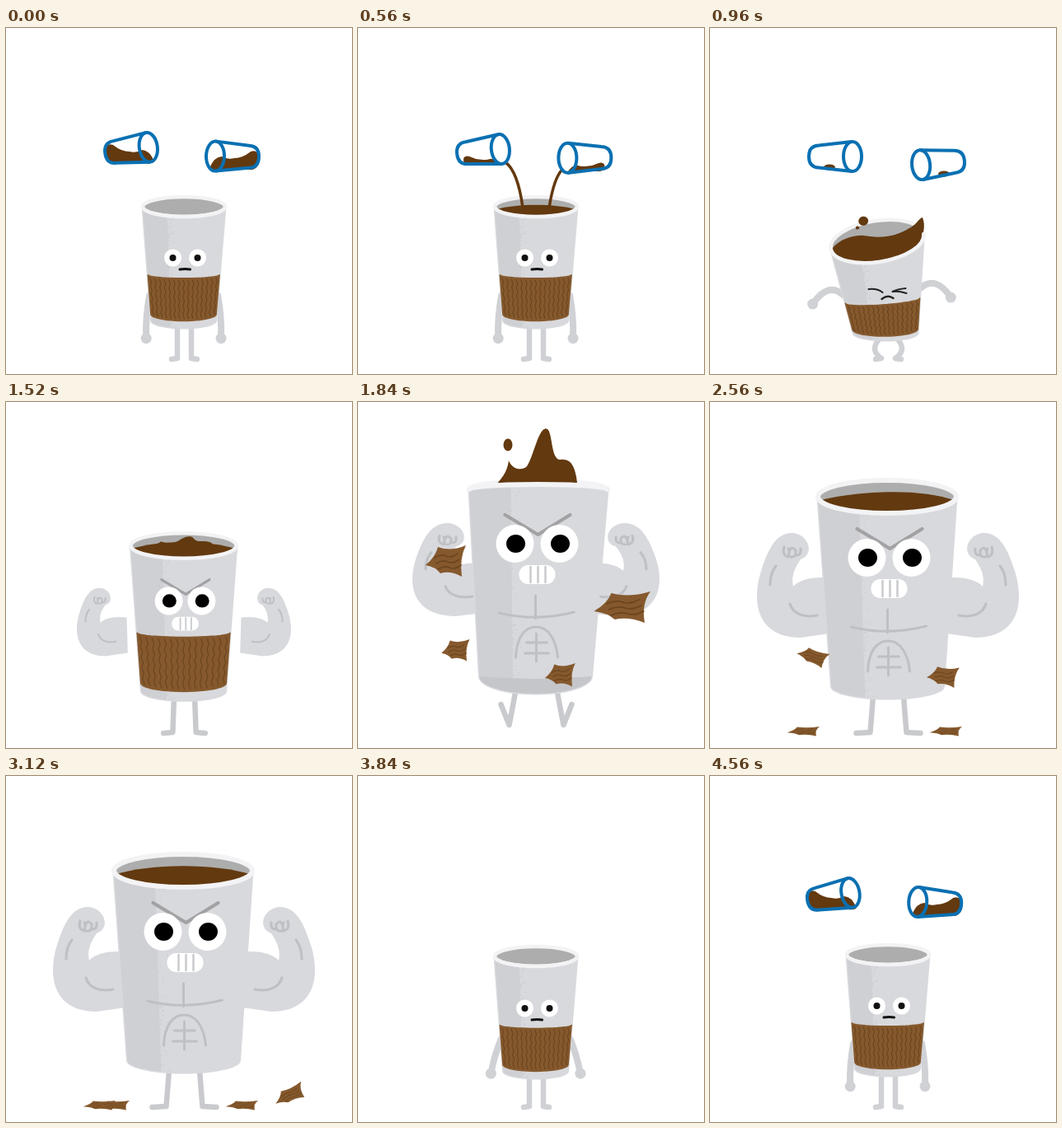
Recreate the animation shown at these times as an HTML page. Size 420 by 420 pixels, loop 4640 ms.

```html
<!DOCTYPE html>
<html lang="en">
<head>
<meta charset="utf-8">
<title>Coffee power</title>
<style>
html, body { margin: 0; width: 100%; height: 100%; overflow: hidden; background: #fff; }
svg { display: block; width: 100vw; height: 100vh; }
</style>
</head>
<body>
<svg id="stage" viewBox="0 0 420 420" fill="none" stroke-linecap="round" stroke-linejoin="round"></svg>
<script>
const LOOP = 4640, STEP = 80, BURST = 1680, HOP = 1840;
const COFFEE = '#63390f', CARD = '#85592d', CARD_DARK = '#6c451e', LINE = '#bfc0c4';
const BLUE = '#0a70b2', RIM = '#f3f3f5', WALL = '#d8d9dd', SHADE = '#cfd0d4', LIMB = '#d0d1d5';
const stage = document.getElementById('stage');

// Timing helpers
const mix = (a, b, k) => a + (b - a) * k;
const within = (t, a, b) => t >= a && t < b;
function ramp(t, a, b) {
  const k = Math.min(1, Math.max(0, (t - a) / (b - a)));
  return k * k * (3 - 2 * k);
}
const bell = (t, mid, half) => Math.abs(t - mid) < half ? Math.cos((t - mid) / half * Math.PI / 2) ** 2 : 0;

// Drawing helpers
const path = (d, fill, stroke, w = 3) =>
  `<path d="${d}" fill="${fill || 'none'}" ${stroke ? `stroke="${stroke}" stroke-width="${w}"` : ''}/>`;
const oval = (x, y, rx, ry, fill, more = '') =>
  `<ellipse cx="${x}" cy="${y}" rx="${rx}" ry="${ry}" fill="${fill}" ${more}/>`;
const group = (tf, s) => `<g transform="${tf}">${s}</g>`;
const twins = (axis, s) => s + group(`translate(${2 * axis} 0) scale(-1 1)`, s);
const poly = pts => 'M' + pts.map(p => p.map(n => n.toFixed(1)).join()).join('L');
const list = (n, f) => Array.from({ length: n }, (_, i) => f(i));

const small = { x: 216, y: 217, rx: 50, ry: 12, base: 355, bw: 39, sag: 9, face: 279, hip: 8.5, foot: 8.5, toe: 7 };
const large = { x: 215, y: 115, rx: 84, ry: 20, base: 345, bw: 68, sag: 15, face: 189, hip: 18, foot: 22, toe: 17 };

// Growth, crouch, lean and hop together give the whole pose
function poseAt(t) {
  const burst = bell(t, 1660, 130);
  const grow = ramp(t, 1440, 1620) - ramp(t, 3280, 3520);
  const dip = bell(t, 960, 400);
  const crouch = dip + bell(t, 1340, 180) + .7 * bell(t, 3520, 160);
  const lean = dip * Math.cos((t - 960) / 200 * Math.PI);
  const hop = bell(t, HOP, 160), settle = bell(t, 3840, 280);
  const p = { burst, grow, crouch, lean, hop, settle };
  for (const key in small) p[key] = mix(small[key], large[key], grow + .1 * burst);
  p.x += 4 * hop - 13 * lean;
  p.y += 42 * crouch - 9 * hop + 2 * settle;
  p.rx += 7 * crouch;
  p.ry += 13 * crouch - 10 * hop;
  p.front = mix(p.ry, -6, hop);
  p.tilt = -9 * lean;
  p.bx = 215.5 - 2.5 * lean;
  p.base += 15 * crouch - 12 * hop + 3 * settle;
  p.sag += 6 * hop;
  p.face += 40 * crouch - 17 * hop + 3 * settle;
  p.strong = grow > .15;
  return p;
}

// Point on the cup wall: u across (-1..1), v from rim to base
function wallOf(p) {
  const a = p.tilt * Math.PI / 180, c = Math.cos(a), n = Math.sin(a);
  return (u, v) => {
    const r = Math.sqrt(Math.max(0, 1 - u * u)), front = p.front * r * (1 - v) ** 3;
    return [mix(p.x + u * p.rx * c, p.bx + u * p.bw, v) - n * front,
      mix(p.y + u * p.rx * n, p.base, v) + c * front + p.sag * v * v * r];
  };
}

const strongArm = path('M150,214C125,211 108,216 101,224C98,210 104,200 110,191C126,186 122,163 102,159C80,157 70,180 62,205C49,247 60,286 110,286L152,280Z', WALL) +
  path('M97,245C101,258 115,262 130,259M73,222Q73,208 80,199M90,176Q87,186 95,188Q97,181 95,178M98,188Q105,189 104,180Q99,174 97,180M105,186Q111,186 110,178', '', LINE, 3.2);

const faces = {
  calm: [-15, 15].map(x => oval(x, 0, 10.5, 10.5, '#fff') + oval(x, 0, 4, 4, '#111')).join('') +
    path('M-6.5,14Q0,13 6,14', '', '#111', 3),
  squint: path('M-23,-2Q-12,-3 -6,2M22,-3Q12,-2 6,1Q14,0 23,3', '', '#222', 2) + path('M-7,10Q0,4 7,9', '', '#222', 2.4),
  fierce: path('M-39,-35L1,-11L40,-35', '', '#a2a2a4', 4.2) +
    [-27, 27].map(x => oval(x, 0, 23, 23, '#fff') + oval(x + 1, 0, 11.5, 11, '#000')).join('') +
    '<rect x="-22" y="26" width="44" height="23" rx="11" fill="#fff"/>' +
    path('M-8,28V47M1,28V47M10,28V47', '', '#cbccd0', 2.6) +
    path('M-2,63V91M-46,84Q-2,95 45,83M-26,138C-25,112 -14,101 -1,101C13,101 23,116 25,138M-1,109V143M-13,120H12M-15,133H14', '', LINE, 3)
};

function legs(p) {
  const x = 216.5, hipX = x - p.hip - 5 * p.hop, hipY = p.base + 5;
  const footX = x - p.foot - 11 * p.hop, footY = 401 - 9 * p.hop;
  const kneeX = (hipX + footX) / 2 - 16 * p.crouch, kneeY = (hipY + footY) / 2 + 2;
  const toe = p.toe - 7 * p.hop;
  return twins(x, path(`M${hipX},${hipY}Q${kneeX},${kneeY} ${footX},${footY}l${-toe},${1 - 26 * p.hop}`, '', p.strong ? '#c9cacd' : LIMB, 6.5));
}

function arms(p, wall) {
  if (p.strong) {
    const size = mix(.4, 1, p.grow) + .3 * p.burst;
    const dx = 9 * p.hop - 14 * p.burst, dy = 60 * (1 - p.grow) - 22 * p.hop;
    return twins(216, group(`translate(${140 + dx} ${250 + dy}) scale(${size} ${size * (1 - .11 * p.hop)}) translate(-140 -250)`, strongArm));
  }
  const lift = Math.min(1, p.crouch + .25 * p.settle);
  return [-1, 1].map(side => {
    const [x, y] = wall(side, mix(.78, .55, lift));
    const dx = side * mix(4, 37, lift), dy = mix(52, 11, lift);
    const bx = x + dx / 2 + side * 3 * (1 - lift), by = y + dy / 2 - 22 * p.crouch;
    return path(`M${x},${y}Q${bx},${by} ${x + dx},${y + dy}`, '', LIMB, 8) + oval(x + dx, y + dy, 6.5, 6.5, LIMB);
  }).join('');
}

let seed = 7;
const rnd = () => (seed = seed * 16807 % 2147483647) / 2147483647;
const specks = list(110, () => [-.4 + (rnd() + rnd() - 1) * .2, rnd()]);

function cup(t) {
  const p = poseAt(t), wall = wallOf(p);
  const row = (v, a, b) => list(25, i => wall(mix(a, b, (1 - Math.cos(i / 24 * Math.PI)) / 2), v));
  const band = (v0, v1, a = -1, b = 1) => poly([...row(v0, a, b), ...row(v1, a, b).reverse()]) + 'Z';
  const place = s => group(`translate(${p.x} ${p.y}) rotate(${p.tilt})`, s);

  let s = legs(p) + arms(p, wall) + place(opening(t, p));
  s += path(band(0, 1), WALL, WALL, 3) + path(band(0, 1, -1, -.4), SHADE);
  s += path(specks.map(q => poly([wall(...q)]) + 'h.1').join(''), '', '#cccdd1', 1.6);
  if (p.hop > .3) s += path(poly(row(1, -1, 1)) + `Q${p.bx},${p.base + 6} ${p.bx - p.bw},${p.base}Z`, '#c5c6ca');

  const mood = p.strong ? 'fierce' : p.crouch > .15 ? 'squint' : 'calm';
  const size = p.strong ? mix(.55, 1, p.grow) : 1;
  s += group(`translate(${217.5 - 2 * p.lean} ${p.face}) scale(${size})`, faces[mood]);
  if (!within(t, BURST, 3440)) s += sleeve(band, wall, .05 * p.crouch);
  const rim = p.rx > 70 ? 6 : 4.5;
  return s + place(path(`M${-p.rx},0A${p.rx},${Math.abs(p.front)} 0 0 ${p.front > 0 ? 0 : 1} ${p.rx},0`, '', RIM, rim));
}

function sleeve(band, wall, drop) {
  const top = .6 + drop, end = .945 + drop / 3;
  const waves = list(15, i => poly(list(10, j =>
    wall(-.93 + i * .133 + (j % 2 ? .02 : -.02), mix(top + .015, end - .015, j / 9)))));
  return path(band(top, end, -1, 1), CARD, CARD, 1.5) + path(waves.join(''), '', CARD_DARK, 1.2);
}

// Everything seen through the rim, around its centre
function opening(t, p) {
  const u = p.rx - 1.5, v = p.ry - 1.5;
  const level = ramp(t, 160, 640) - ramp(t, 3280, 3440);
  const k = Math.abs(p.lean), splash = 1.46 * ramp(t, 1480, BURST) * (1 - ramp(t, 1600, 2240));
  let s = oval(0, 0, p.rx, p.ry, '#adadad', `stroke="${RIM}" stroke-width="${p.rx > 70 ? 6 : 4.5}"`);
  if (k > .2) {
    const pt = (a, b) => `${a * u},${b * v * (b < 0 ? k : 1)}`;
    s += group(`scale(${Math.sign(p.lean)} 1)`, path(
      `M${pt(-1, 0)}C${pt(-.8, -.4)} ${pt(-.55, -.5)} ${pt(-.3, -.42)}C${pt(.1, -.1)} ${pt(.4, -.1)} ${pt(.72, -.4)}` +
      `C${pt(.9, -.5)} ${pt(.98, -.85)} ${pt(1.06, -.85)}C${pt(1.1, -.4)} ${pt(1.03, 0)} ${pt(.9, .42)}` +
      `A${u},${v} 0 0 1 ${pt(-1, 0)}Z`, COFFEE) +
      oval(-.23 * u, -1.15 * v * k, 6 * k, 5.5 * k, COFFEE) + oval(-.38 * u, -.85 * v * k, 2.2, 2, COFFEE));
  } else if (level > .01) {
    const edge = mix(1, .26, level) * v, mid = mix(1, -.5, level) * v;
    const wave = bell(t, 2200, 640) * Math.sin(t / 130) * v * .4;
    s += `<clipPath id="mouth"><ellipse rx="${u}" ry="${v}"/></clipPath><g clip-path="url(#mouth)">` +
      path(`M${-u},${edge}C${-u / 2},${mid + wave} ${u / 2},${mid - wave} ${u},${edge}V${v + 2}H${-u}Z`, COFFEE) + '</g>';
  }
  if (splash > .01) s += group(`scale(${p.rx / 84} ${splash})`, path(
    'M-57,0C-45,-12 -38,-20 -36,-35C-32,-24 -20,-22 -14,-28C-6,-40 0,-74 9,-74C18,-74 14,-38 26,-36C40,-38 46,-28 48,2Z', COFFEE));
  return s;
}

function glass(x, y, turn, flip, amount) {
  let s = '';
  if (amount > .25) s += group(`translate(0 ${17 * (1 - amount)}) scale(${mix(.5, 1, amount)} ${amount})`,
    path('M-30,0Q-28,-9 -20,-6Q-10,2 0,2Q8,4 15,0Q24,0 30,14Q28,17 20,16L-22,16Q-31,14 -30,0Z', COFFEE));
  else if (amount > .01) s += oval(-5, 13, 7, 3.5, COFFEE);
  s += group(`rotate(${turn})`,
    path('M22,-18L-18,-13.5Q-30,-13 -30,0Q-30,13 -18,13.5L22,18', '', BLUE, 4) +
    oval(23, 0, 11, 18, 'none', `stroke="${BLUE}" stroke-width="4"`));
  return group(`translate(${x} ${y}) scale(${flip} 1)`, s);
}

function glasses(t) {
  const enter = t < 1200 ? 0 : 1 - ramp(t, 4320, LOOP);
  const tip = t < 1200 ? ramp(t, 400, 960) : 0;
  const amount = t < 1200 ? mix(1, .08, ramp(t, 160, 880)) * (1 - ramp(t, 1000, 1120)) : 1;
  const dy = 8 * tip - 13 * enter, turn = 8 * tip - 14 * enter;
  return glass(150 - 14 * enter, 148 + dy, turn - 8, 1, amount) +
    glass(277 + 2 * tip - 13 * enter + 60 * enter ** 3, 156 + dy, turn * .8 - 1, -1, amount);
}

function streams(t) {
  const end = mix(170, 218, Math.min(1, (t - 80) / 160)), w = mix(6, 2.5, (t - 160) / 560);
  return path(`M179,163Q194,${mix(163, end, .2)} 200,${end}M248,172Q238,${mix(172, end, .2)} 232,${end}`, '', COFFEE, w);
}

// Torn card flies from (x, y) in an arc and lands flat at `to`
const scraps = [
  { x: 106, y: 194, size: 1, to: 113, land: 2480, lift: 40, rest: 0 },
  { x: 118, y: 302, size: .7, to: 130, land: 2760, lift: 102, rest: 0 },
  { x: 320, y: 250, size: 1.4, to: 286, land: 2480, lift: 40, rest: 0 },
  { x: 245, y: 332, size: .75, to: 344, land: 2840, lift: 48, rest: -24 }
];

function scrap(t, { x, y, size, to, land, lift, rest }) {
  const q = Math.min(1, (t - HOP) / (land - HOP));
  const px = mix(x, to, q ** 3), py = mix(y, 400 + rest / 2, q) - 4 * lift * q * (1 - q);
  const w = mix(size, .8, q), h = mix(Math.min(size, 1), rest ? .5 : .3, q ** 3);
  const waves = list(3, i => `M${-13 + i * 2},${-5 + i * 7}q8,-5 14,-2t14,-3`).join('');
  return group(`translate(${px} ${py}) rotate(${rest * q + 30 * Math.sin(q * Math.PI)}) scale(${w} ${h})`,
    path('M-24,4Q-12,-6 -9,-18Q6,-12 25,-20Q17,-5 20,18Q6,10 -6,14Q-12,6 -24,4Z', CARD) + path(waves, '', CARD_DARK, 1.6));
}

function draw(t) {
  let s = cup(t);
  if (within(t, 160, 720)) s += streams(t);
  if (!within(t, 1200, 4400)) s += glasses(t);
  if (within(t, BURST, 2000)) s += oval(182, 52 + (t - HOP) / 2, 5.5, 7.5, COFFEE);
  if (within(t, BURST + STEP, 3360)) s += scraps.map(c => scrap(t, c)).join('');
  stage.innerHTML = s;
}

const start = performance.now();
let last = 0;
function tick(now) {
  const t = Math.floor(Math.max(0, now - start) % LOOP / STEP) * STEP;
  if (t !== last) draw(last = t);
  requestAnimationFrame(tick);
}
draw(0);
requestAnimationFrame(tick);
</script>
</body>
</html>
```
